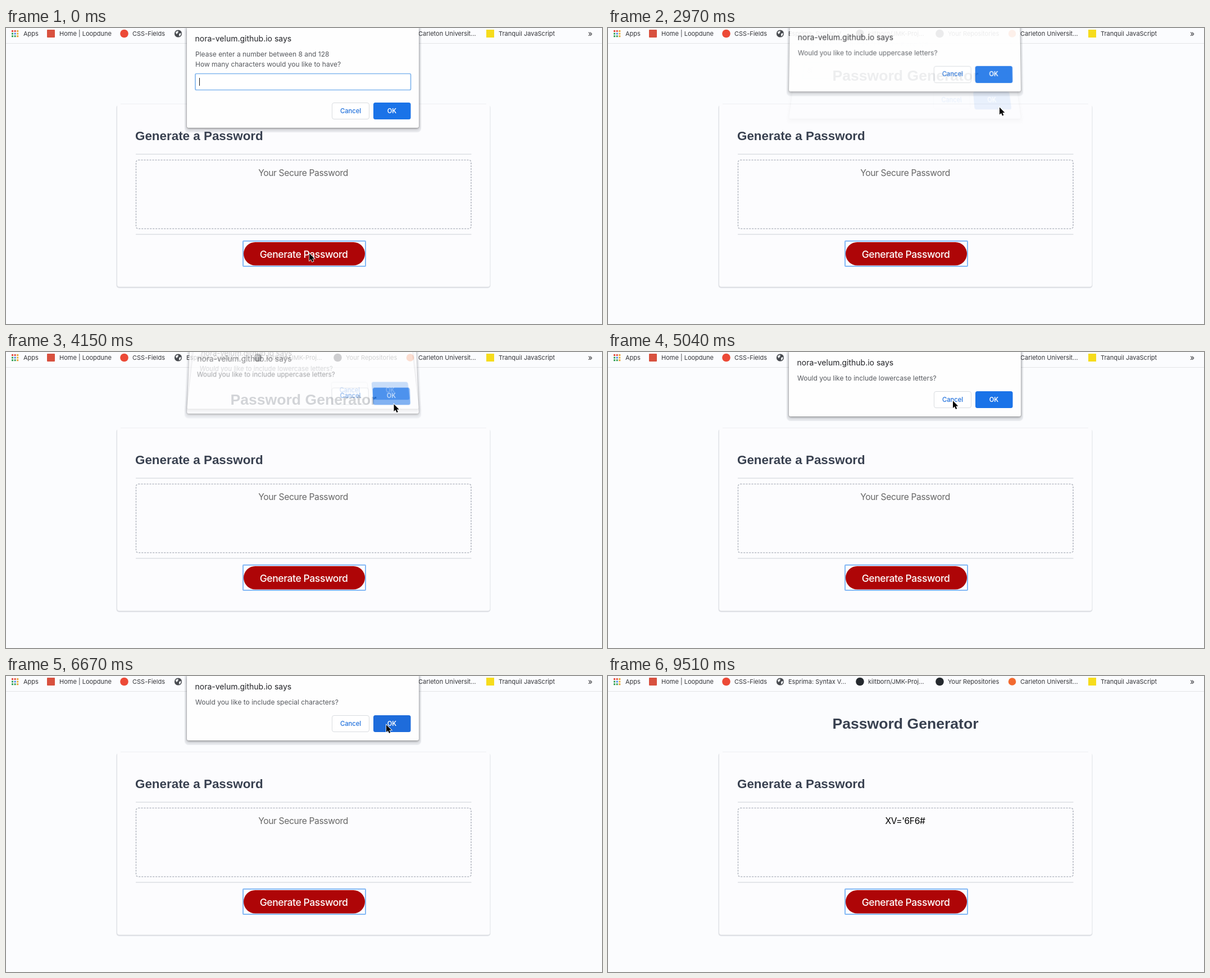
Write an HTML page that moves like this. It is 1061x528 px and loops after 9960 ms.

```html
<!DOCTYPE html>
<html lang="en">
<head>
<meta charset="utf-8">
<title>Password Generator</title>
<style>
  html, body { margin: 0; width: 100%; height: 100%; overflow: hidden; background: #fbfcfe; }
  svg { display: block; font-family: Inter, Roboto, sans-serif; }
  #page, #pointer { position: absolute; left: 0; top: 0; }
  .heading { font-family: "Liberation Sans", Arial, sans-serif; font-weight: 700; fill: #394150; }
  .bookmarks { font-size: 11px; fill: #343539; }
  .center { text-anchor: middle; }
  #password { font-size: 15.6px; letter-spacing: -.35px; }
  .generate { font-size: 17.5px; font-weight: 500; letter-spacing: -.4px; fill: #fff; }
  .dialog {
    position: absolute; left: 322px; top: 0; width: 413px;
    background: #fefefe; border-radius: 0 0 3px 3px; transform-origin: 50% 100%;
    box-shadow: 0 0 0 1px rgba(0,0,0,.12), 0 2px 4px rgba(0,0,0,.32), 0 4px 1px 4px rgba(70,80,100,.11);
  }
  .says { font-size: 14px; fill: #222327; }
  .message { font-size: 12px; fill: #56595e; }
  .label { font-size: 11.2px; font-weight: 500; fill: #1f70dc; text-anchor: middle; }
  .ok { fill: #1a73e8; }
  .ok.hover { fill: #1e6cdb; }
</style>
</head>
<body>
<svg id="page" width="1061" height="528">
  <path d="M0 27.5H1061" stroke="#e3e4e7"/>
  <g id="apps"></g>
  <g id="icons">
    <rect x="73" y="3" width="14" height="14" rx="1" fill="#d8513f"/>
    <circle cx="210.5" cy="10" r="7.3" fill="#ec4a37"/>
    <circle cx="306.5" cy="10" r="6.6" fill="#484b50"/>
    <path d="M302 7l4-2 1 2-2 3-2 1zM308 10l4-1-1 4-3 2z" fill="#eceef0"/>
    <circle cx="448.5" cy="10" r="7.3" fill="#24292e"/>
    <circle cx="590.5" cy="10" r="7.3" fill="#24292e"/>
    <circle cx="719.5" cy="10" r="6.8" fill="#f26a30"/>
    <rect x="855" y="3" width="14" height="14" fill="#f6dc1c"/>
  </g>
  <g id="bookmarks" class="bookmarks"></g>
  <text class="heading center" x="529.5" y="94" font-size="26.6">Password Generator</text>

  <rect x="196.5" y="137" width="666" height="327" rx="5" fill="#dfe1e6"/>
  <rect x="198" y="135" width="663.5" height="326.5" rx="4" fill="#fcfcfe"/>
  <path d="M204 135.5H855" stroke="#eeeff2"/>
  <text class="heading" x="230" y="200" font-size="22.4">Generate a Password</text>
  <path d="M231 225.2H828.5M231 368.2H828.5" stroke="#e1e3e7" stroke-width="1.8"/>
  <rect x="231.5" y="235.5" width="596.5" height="122.5" rx="4" fill="none"
        stroke="#b6bac3" stroke-width="1.6" stroke-dasharray="3 2"/>
  <text id="password" class="center" x="529" y="263.8"></text>
  <rect id="ring" x="422" y="380" width="218" height="45" rx="1" fill="none" stroke="#85b9f5" stroke-width="2"/>
  <rect x="423" y="382" width="216" height="41.5" rx="20.75" fill="#ae0507"/>
  <text class="generate center" x="530" y="409.5">Generate Password</text>
</svg>
<div id="dialogs"></div>
<svg id="pointer" width="1061" height="528">
  <path id="arrow" d="M0 0V13L3 10.2 5 15 7.3 14 5.3 9.5H9.3Z" stroke="#fff" stroke-width="1.6" paint-order="stroke"/>
  <path id="ibeam" d="M-3-6.5Q0-6.5 0-4.5V4.5Q0 6.5-3 6.5M3-6.5Q0-6.5 0-4.5V4.5Q0 6.5 3 6.5M-1.5 2.5H1.5"
        fill="none" stroke="#111" stroke-width="1.2"/>
</svg>

<script>
const LOOP = 9960;
const $ = id => document.getElementById(id);

const bookmarks = [
  [31, "Apps"], [95, "Home | Loopdune"], [225, "CSS-Fields"], [321, "Esprima: Syntax V..."],
  [463, "kiltborn/JMK-Proj..."], [605, "Your Repositories"], [734, "Carleton Universit..."],
  [877, "Tranquil JavaScript"]
];
$("bookmarks").innerHTML =
  bookmarks.map(([x, name]) => `<text x="${x}" y="14">${name}</text>`).join("") +
  `<text x="1036" y="14.5" font-size="14">»</text>`;

const appColors = ["#e24a3b", "#e24a3b", "#e8a33a", "#3aa35a", "#4a86e8", "#e8b53a", "#3aa35a", "#3aa35a", "#e8a33a"];
$("apps").innerHTML = appColors.map((color, i) =>
  `<rect x="${10 + i % 3 * 4.6}" y="${4 + Math.floor(i / 3) * 4.6}" width="3" height="3" fill="${color}"/>`).join("");

function createDialog(lines, isPrompt) {
  const height = isPrompt ? 178 : 115;
  const top = height - 44.5;
  const messages = lines.map((line, i) =>
    `<text class="message" x="337" y="${50.7 + i * 18.5}">${line}</text>`).join("");
  const input = isPrompt ? `
    <rect x="337" y="81.5" width="383.5" height="29" rx="2" fill="#fff" stroke="#84b7ee" stroke-width="1.7"/>
    <text id="typed" x="344" y="100.2" font-size="12" fill="#222"></text>
    <rect id="caret" y="89" width="1" height="14" fill="#111"/>` : "";
  const box = document.createElement("div");
  box.className = "dialog";
  box.style.height = height + "px";
  box.innerHTML = `<svg width="413" height="${height}" viewBox="322 0 413 ${height}">
    <text class="says" x="336.5" y="24">nora-velum.github.io says</text>
    ${messages}${input}
    <rect x="580.5" y="${top}" width="66" height="29" rx="3.5" fill="#fff" stroke="#d9dce0"/>
    <text class="label" x="613.5" y="${top + 18}">Cancel</text>
    <rect class="ok" x="654" y="${top - .5}" width="66.5" height="30" rx="3.5"/>
    <text class="label" x="687" y="${top + 18}" style="fill:#fff;font-weight:600">OK</text>
  </svg>`;
  $("dialogs").append(box);
  return { box, top, ok: box.querySelector(".ok") };
}

const include = what => [`Would you like to include ${what}?`];
const dialogs = {
  length: createDialog(["Please enter a number between 8 and 128", "How many characters would you like to have?"], true),
  upper: createDialog(include("uppercase letters")),
  lower: createDialog(include("lowercase letters")),
  numbers: createDialog(include("numbers")),
  special: createDialog(include("special characters"))
};

// Open dialogs from each time on, with how far each one is lifted towards closed.
const dialogSteps = [
  [0, { length: 0 }],
  [2820, { length: 8 }],
  [2970, { length: 19, upper: 2 }],
  [3120, { upper: 0 }],
  [4150, { upper: 6, lower: 16 }],
  [4300, { lower: 0 }],
  [5490, { lower: 6, numbers: 16 }],
  [5640, { numbers: 0 }],
  [6520, { numbers: 6, special: 16 }],
  [6670, { special: 0 }],
  [7720, { special: 13 }],
  [7870, {}]
];

const pointerSteps = [
  [0, 540, 402], [290, 614, 257], [440, 634, 160], [590, 637, 118], [740, 637, 106], [880, 636, 104],
  [1030, 636, 102], [2380, 672, 125], [2530, 694, 139], [2680, 697, 141.5],
  [3560, 695, 110], [3710, 690.5, 93], [4890, 640, 89], [5040, 614, 87],
  [5930, 650, 87], [6080, 677, 87],
  [8910, 702, 127], [9060, 835, 410], [9210, 940, 480], [9360, 981, 514], [9510, 1100, 560]
];

const caretSteps = [[0, true], [440, false], [880, true], [1330, false], [1930, true]];

const current = (steps, t) => steps.findLast(step => step[0] <= t);
const show = (element, on) => { element.style.visibility = on ? "visible" : "hidden"; };

// A closing dialog fades, rises, stretches a little and tilts its top edge away.
const liftTransform = lift =>
  `translateY(${-lift * .85}px) perspective(300px) rotateX(${lift * .6}deg) scaleY(${1 + lift * .007})`;

function draw(t) {
  const open = current(dialogSteps, t)[1];
  const [, x, y] = current(pointerSteps, t);

  for (const [name, { box, top, ok }] of Object.entries(dialogs)) {
    const lift = open[name];
    box.style.display = lift === undefined ? "none" : "block";
    if (lift === undefined) continue;
    box.style.opacity = Math.max(0, 1 - lift * .048);
    box.style.transform = lift ? liftTransform(lift) : "none";
    ok.classList.toggle("hover", !lift && x > 654 && x < 720 && y > top && y < top + 29);
  }

  const typed = t >= 1930;
  $("typed").textContent = typed ? "8" : "";
  $("caret").setAttribute("x", typed ? 351.5 : 344);
  $("caret").setAttribute("opacity", +current(caretSteps, t)[1]);

  const done = t >= 7720;
  $("password").textContent = done ? "XV='6F6#" : "Your Secure Password";
  $("password").setAttribute("fill", done ? "#000" : "#666");
  show($("ring"), !done || t >= 7870);

  const inField = "length" in open && x > 337 && x < 720 && y > 81 && y < 110;
  show($("arrow"), !inField);
  show($("ibeam"), inField);
  for (const id of ["arrow", "ibeam"]) $(id).setAttribute("transform", `translate(${x} ${y})`);
}

const start = performance.now();
function tick() {
  draw((performance.now() - start) % LOOP);
  requestAnimationFrame(tick);
}
tick();
</script>
</body>
</html>
```
